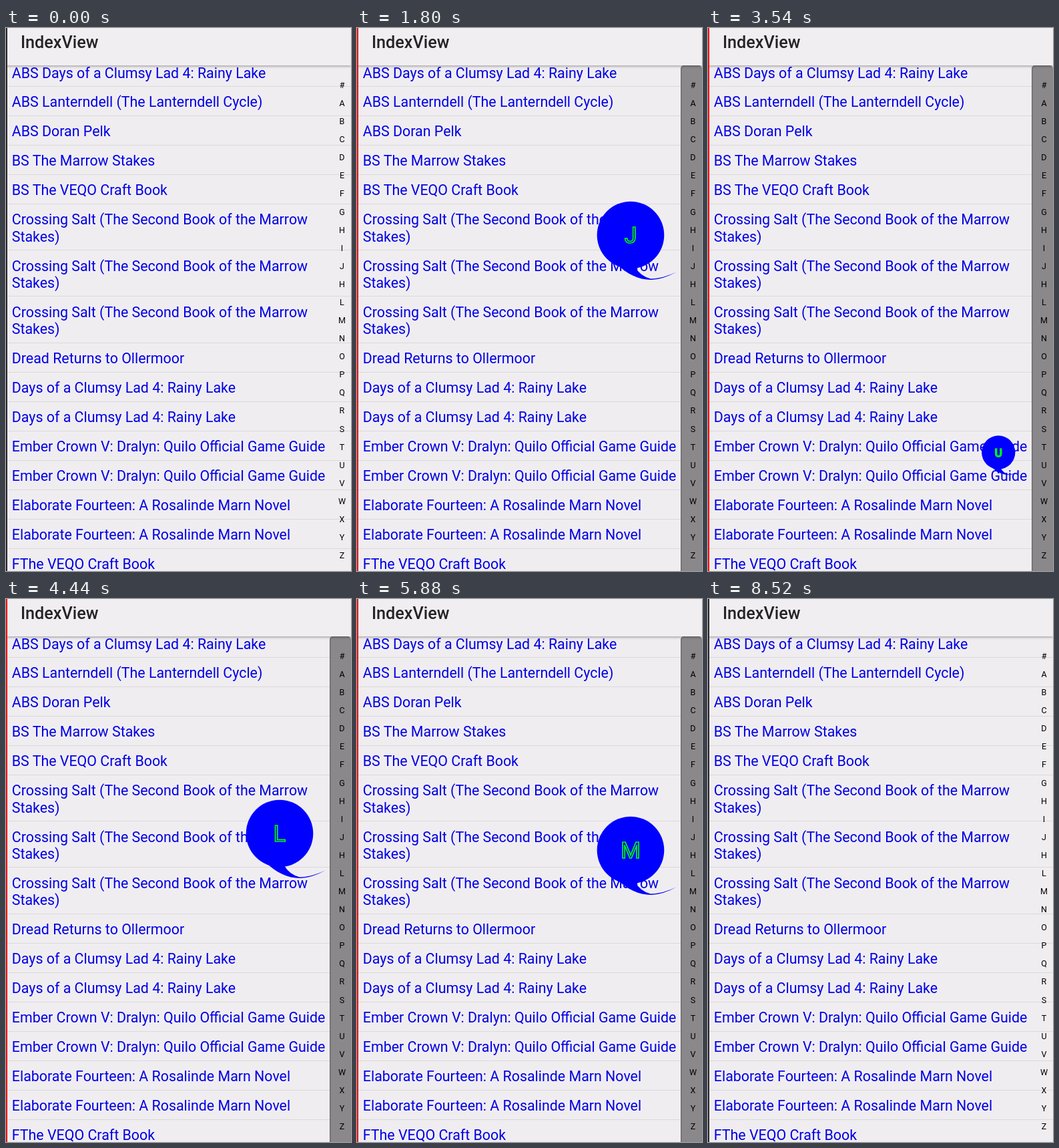
Recreate the animation shown at these times as an HTML page. Size 517 by 813 pixels, loop 8.58 s.

```html
<!DOCTYPE html>
<html lang="en">
<head>
<meta charset="utf-8">
<title>IndexView</title>
<style>
  html, body { margin: 0; width: 100%; height: 100%; overflow: hidden; }
  body { position: relative; background: #f0edf1; font-family: Roboto, sans-serif; }
  #edge { position: absolute; left: 0; top: 0; width: 2px; height: 813px; background: #2b2a2e; z-index: 4; }
  header {
    position: absolute; left: 0; top: 0; width: 517px; height: 56px; z-index: 1;
    background: #f0eef1; box-shadow: 0 1px 4px rgba(0, 0, 0, .4);
    font-size: 25.16px; font-weight: 500; line-height: 44px; color: #242326;
    text-indent: 22px;
  }
  ul { position: absolute; left: 0; top: 44px; width: 517px; margin: 0; padding: 0; list-style: none; }
  li {
    box-sizing: border-box; padding: 10.5px 0 7.2px 8.8px;
    border-bottom: 1px solid #dad9db;
    font-size: 21.39px; line-height: 25.3px; color: #0000e6; white-space: nowrap;
  }
  #bar {
    position: absolute; left: 485px; top: 56px; width: 32px; height: 763px;
    border-radius: 5px; background: #8a888a; box-shadow: inset 1px 0 2px rgba(0, 0, 0, .3);
  }
  svg { position: absolute; left: 0; top: 0; z-index: 2; }
  #index text { font-size: 12.58px; text-anchor: middle; }
  #letter {
    font-size: 34px; text-anchor: middle; fill: none;
    stroke: #0f0; stroke-width: 1.7; vector-effect: non-scaling-stroke;
  }
</style>
</head>
<body>
<div id="edge"></div>
<header>IndexView</header>
<ul id="list"></ul>
<div id="bar"></div>
<svg width="517" height="813">
  <g id="index"></g>
  <g id="bubble">
    <circle r="50.3" fill="#00f"/>
    <path fill="#00f" d="M-20 44C-6 58 12 67 31 67Q50 66 69 55Q50 64.8 30 65.5Q14 61 7 48Z"/>
    <text id="letter" y="12"></text>
  </g>
</svg>
<script>
const LOOP = 8580, STEP = 60, SCALE_TIME = 240;
const LETTERS = "#ABCDEFGHIJHLMNOPQRSTUVWXYZ";
const FIRST_Y = 85.5, PITCH = 27.08;

const diary = "Days of a Clumsy Lad 4: Rainy Lake";
const crafts = "The VEQO Craft Book";
const sequel = "Crossing Salt (The Second Book of the Marrow<br>Stakes)";
const guide = "Ember Crown V: Dralyn: Quilo Official Game Guide";
const novel = "Elaborate Fourteen: A Rosalinde Marn Novel";
const titles = [
  "ABS " + diary, "ABS Lanterndell (The Lanterndell Cycle)", "ABS Doran Pelk",
  "BS The Marrow Stakes", "BS " + crafts, sequel, sequel, sequel,
  "Dread Returns to Ollermoor", diary, diary, guide, guide, novel, novel, "F" + crafts
];

// Each touch: bar on/off times, end of the bubble, and the finger's path as [time, y].
const touches = [
  { on: 840, off: 2580, gone: 2940, path: [[840, 165], [1200, 172], [2400, 558], [2640, 600]] },
  { on: 3360, off: 4800, gone: 5100, path: [[3540, 657], [4440, 406], [4800, 330]] },
  { on: 5580, off: 6420, gone: 6720, path: [[5580, 410], [5880, 431], [6420, 520]] }
];

const $ = id => document.getElementById(id);
const clamp = (v, lo, hi) => Math.min(hi, Math.max(lo, v));

$("list").innerHTML = titles.map(title => `<li>${title}</li>`).join("");
$("index").innerHTML = [...LETTERS].map((c, i) =>
  `<text x="503.5" y="${FIRST_Y + 4.5 + i * PITCH}">${c}</text>`).join("");

function fingerY(path, t) {
  const next = path.findIndex(([time]) => time > t);
  if (next === 0) return path[0][1];
  if (next < 0) return path[path.length - 1][1];
  const [t0, y0] = path[next - 1], [t1, y1] = path[next];
  return y0 + (y1 - y0) * (t - t0) / (t1 - t0);
}

function draw(t) {
  $("edge").style.background = t >= 840 && t < 8520 ? "#f00" : "#2b2a2e";
  const touch = touches.find(({ on, gone }) => t >= on && t < gone);
  $("bar").style.display = touch && t < touch.off ? "" : "none";

  const grow = touch ? (t - touch.on - STEP) / SCALE_TIME : 0;
  const shrink = touch ? (touch.gone - t) / SCALE_TIME : 0;
  const scale = clamp(Math.min(grow, shrink), 0, 1);
  $("bubble").style.display = scale ? "" : "none";
  if (!scale) return;

  // The bubble scales about its lower right corner.
  const y = fingerY(touch.path, t);
  const row = clamp(Math.round((y - FIRST_Y) / PITCH), 0, LETTERS.length - 1);
  $("letter").textContent = LETTERS[row];
  $("bubble").setAttribute("transform",
    `translate(460.5 ${y + 12}) scale(${scale}) translate(-50.5 -67)`);
}

function tick() {
  const t = performance.now() % LOOP;
  draw(Math.floor(t / STEP) * STEP);
  requestAnimationFrame(tick);
}
tick();
</script>
</body>
</html>
```
